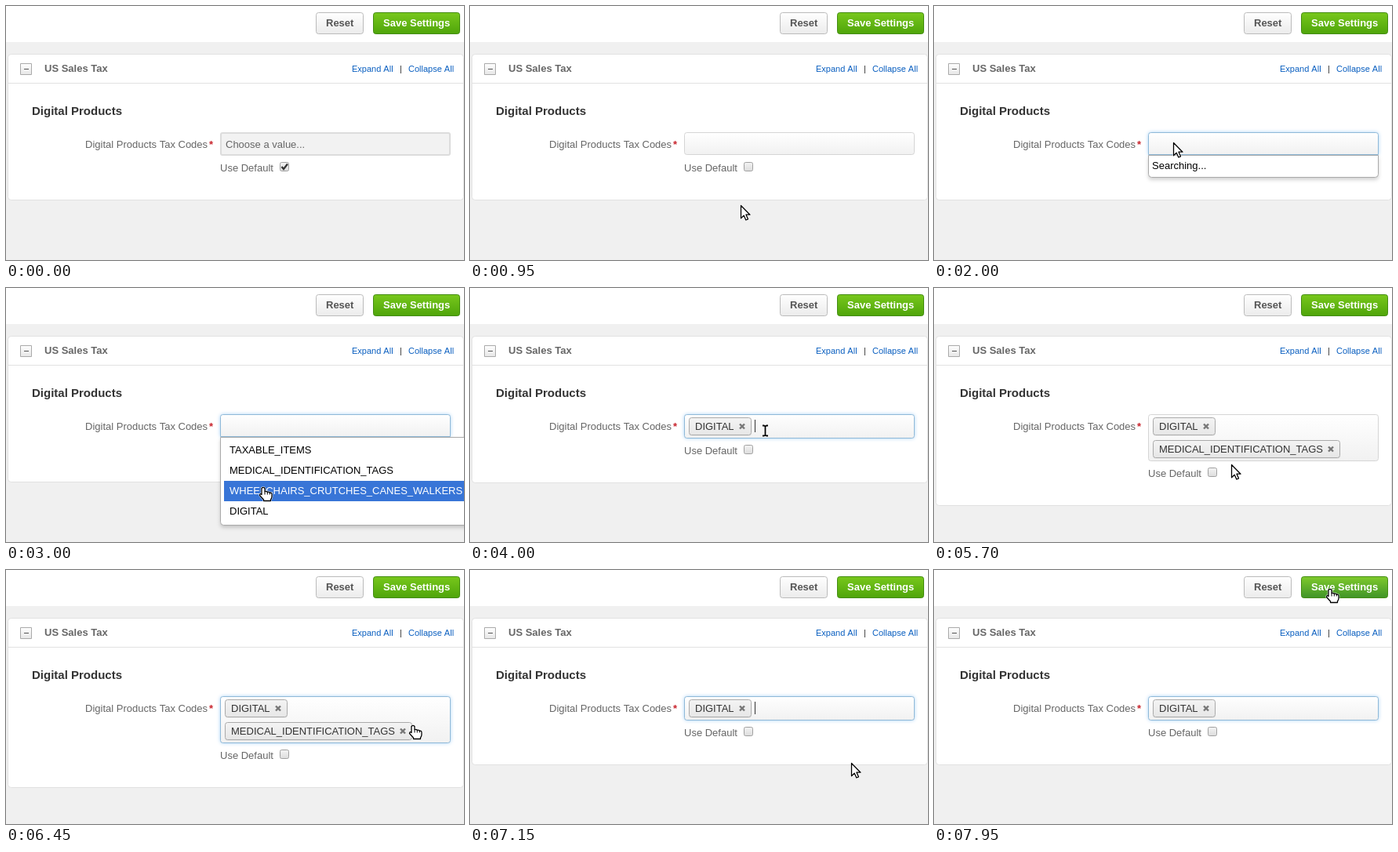
An HTML page with a canvas that plays this animation: 584x324 px, repeating every 8 s.

```html
<!DOCTYPE html>
<html>
<head>
<meta charset="utf-8">
<style>
html, body { margin: 0; width: 100%; height: 100%; overflow: hidden; background: #f0f0f0; }
canvas { display: block; }
</style>
</head>
<body>
<canvas id="stage" width="584" height="324"></canvas>
<script>
const ctx = document.getElementById('stage').getContext('2d');
const LOOP = 8000, STEP = 50;
const CODES = ['TAXABLE_ITEMS', 'MEDICAL_IDENTIFICATION_TAGS',
  'WHEELCHAIRS_CRUTCHES_CANES_WALKERS', 'DIGITAL'];

// Pointer path: time, x, y
const PATH = [
  [0, 366, 322], [50, 366, 304], [550, 337, 202], [700, 337, 202], [950, 345, 254],
  [1250, 312, 149], [1500, 305, 174], [2750, 305, 174], [3000, 328, 254], [3250, 325, 289],
  [3400, 325, 289], [3850, 376, 182], [5100, 376, 182], [5350, 378, 232], [5500, 378, 232],
  [5700, 379, 225], [5900, 428, 271], [6000, 428, 271], [6400, 521, 198], [6650, 506, 200],
  [6950, 506, 200], [7150, 486, 246], [7800, 503, 35], [7950, 505, 24]
];
const POINTERS = [[50, 'arrow'], [2850, 'hand'], [3500, 'arrow'], [3750, 'beam'], [4250, 'arrow'],
  [5200, 'hand'], [5500, 'arrow'], [6350, 'hand'], [7050, 'arrow'], [7850, 'hand']];
const SHAPES = {
  arrow: new Path2D('M.5 .5V16.8L4.2 13.3L6.8 19L9.5 17.8L7 12.2H12Z'),
  hand: new Path2D('M-2 1.5Q0-.9 2 1.5V6Q4 4.5 5.5 6.5Q7.5 5.5 8.5 7.5Q11 6.5 11 9.5V12Q11 14 9.5 16V17.5H.5V16L-4.5 10.5Q-4.5 7.5-2 9.5Z'),
  beam: new Path2D('M-3-6.5H-1L.5-5.5L2-6.5H4M.5-5.5V5.5M-3 6.5H-1L.5 5.5L2 6.5H4')
};

const within = (t, ...spans) => spans.some(([a, b]) => t >= a && t < b);

function pointerAt(t) {
  const i = PATH.findIndex(p => p[0] > t);
  if (i < 0) return PATH[PATH.length - 1].slice(1);
  const [t0, x0, y0] = PATH[i - 1], [t1, x1, y1] = PATH[i];
  let k = (t - t0) / (t1 - t0);
  k *= k * (3 - 2 * k);
  return [Math.round(x0 + (x1 - x0) * k), Math.round(y0 + (y1 - y0) * k)];
}

function text(str, x, y, color, font = '13px') {
  ctx.font = font + ' "Liberation Sans", Arial, sans-serif';
  ctx.fillStyle = color;
  ctx.fillText(str, x, y);
}

function fillRect(x, y, w, h, color) {
  ctx.fillStyle = color;
  ctx.fillRect(x, y, w, h);
}

// Rounded box with a vertical gradient, a border and an optional shadow
function box(x, y, w, h, r, top, bottom, border, shadow, line = 1) {
  const fill = ctx.createLinearGradient(0, y, 0, y + h);
  fill.addColorStop(0, top);
  fill.addColorStop(1, bottom);
  ctx.beginPath();
  ctx.roundRect(x + line / 2, y + line / 2, w - line, h - line, r);
  ctx.save();
  if (shadow) [ctx.shadowColor, ctx.shadowBlur, ctx.shadowOffsetY] = shadow;
  ctx.fillStyle = fill;
  ctx.fill();
  ctx.restore();
  ctx.strokeStyle = border;
  ctx.lineWidth = line;
  ctx.stroke();
}

function strokePath(points, color, width) {
  ctx.beginPath();
  points.forEach(([x, y], i) => i ? ctx.lineTo(x, y) : ctx.moveTo(x, y));
  ctx.strokeStyle = color;
  ctx.lineWidth = width;
  ctx.stroke();
}

function tag(label, y) {
  ctx.font = '13px "Liberation Sans", Arial, sans-serif';
  const w = Math.round(ctx.measureText(label).width);
  box(279, y, w + 30, 23, 3, '#f4f4f4', '#e6e6e6', '#aaa', ['rgba(0,0,0,.08)', 1, 1]);
  text(label, 287, y + 16, '#333');
  const x = 297 + w, c = y + 11.5;
  strokePath([[x - 3, c - 3], [x + 3, c + 3]], '#777', 2.4);
  strokePath([[x - 3, c + 3], [x + 3, c - 3]], '#777', 2.4);
}

function checkbox(y, checked) {
  box(349, y, 12, 12, 2, '#f4f4f4', '#dcdcdc', '#a0a0a0');
  if (checked) strokePath([[351.5, y + 6], [354, y + 9], [359, y + 2.5]], '#333', 2.3);
}

function header(hover) {
  fillRect(0, 0, 584, 324, '#f0f0f0');
  fillRect(0, 0, 584, 46, '#fff');
  box(395, 8, 61, 28, 3, '#fff', '#ebebeb', '#bbb');
  text('Reset', 408, 26, '#555', 'bold 13px');
  box(468, 8, 111, 28, 3, hover ? '#80cb2c' : '#78c81c', hover ? '#3f9328' : '#4ea40a', '#438c12');
  text('Save Settings', 481, 26, '#fff', 'bold 13px');
}

function panel(bottom) {
  box(2, 61, 582, bottom - 61, 4, '#fff', '#fff', '#e1e1e1');
  fillRect(3, 98, 580, 1, '#e1e1e1');
  box(18, 73, 15, 15, 0, '#fff', '#e6e6e6', '#aaa');
  fillRect(23, 80, 6, 1, '#555');
  text('US Sales Tax', 49, 84, '#666', 'bold 13px');
  text('Expand All', 441, 84, '#0a5fc0', '11px');
  text('|', 502, 84, '#333', '11px');
  text('Collapse All', 513, 84, '#0a5fc0', '11px');
  text('Digital Products', 33, 139, '#333', 'bold 15px');
  text('Digital Products Tax Codes', 101, 181, '#666');
  text('*', 259, 181, '#c8232c', 'bold 13px');
}

function dropdown(top, items, pointerY) {
  const h = items ? items.length * 26 + 9 : 29;
  box(273, top, items ? 340 : 294, h, [0, 0, 4, 4], '#fff', '#fff', '#aaa', ['rgba(0,0,0,.2)', 5, 3]);
  if (!items) return text('Searching...', 278, top + 18, '#000');
  const active = Math.max(0, Math.min(items.length - 1, Math.floor((pointerY - top - 4) / 26)));
  items.forEach((item, i) => {
    const y = top + 4 + i * 26;
    if (i === active) fillRect(278, y, 330, 26, '#3875d7');
    text(item, 285, y + 17, i === active ? '#fff' : '#000');
  });
}

function drawPointer(kind, x, y) {
  ctx.save();
  ctx.translate(x, y);
  ctx.lineJoin = 'round';
  const shape = SHAPES[kind];
  const stroke = (color, width) => {
    ctx.strokeStyle = color;
    ctx.lineWidth = width;
    ctx.stroke(shape);
  };
  if (kind === 'beam') {
    stroke('#fff', 4);
    stroke('#000', 1.8);
  } else {
    stroke('rgba(255,255,255,.7)', 2.6);
    ctx.fillStyle = '#fff';
    ctx.fill(shape);
    stroke('#000', 1.3);
    if (kind === 'hand')
      for (const dx of [2, 5.3, 8.3]) strokePath([[dx, 6.5], [dx, 9.5]], '#000', 1);
  }
  ctx.restore();
}

function render(t) {
  const [px, py] = pointerAt(t);
  const isDefault = t < 750;
  const digital = t >= 3500, medical = within(t, [5450, 7000]);
  const focus = within(t, [1500, 3500], [3800, 5450], [5800, LOOP]);
  const searching = within(t, [1500, 2450], [4250, 5150]);
  const listing = within(t, [2450, 3500], [5150, 5450]);
  const caret = within(t, [1500, 2000], [2500, 3000], [3800, 4750], [5250, 5450],
    [5800, 6300], [6800, 7500]);
  const fieldBottom = medical ? 221 : digital ? 192 : 190;
  const rowShift = medical ? 30 : digital ? 1 : 0;

  header(t >= 7850);
  panel(248 + rowShift);
  text('Use Default', 273, 211 + rowShift, '#666');
  checkbox(199 + rowShift, isDefault);

  if (isDefault) {
    box(273, 161, 294, 30, 2, '#f2f2f2', '#f2f2f2', '#dcdcdc', null, 2);
    text('Choose a value...', 280, 181, '#666');
  } else {
    box(273, 161, 294, fieldBottom - 161, searching || listing ? [3, 3, 0, 0] : 3, '#fff', '#f1f1f1',
      focus ? '#8fb9d8' : '#d5d5d5', focus && ['rgba(90,170,240,.6)', 5, 0]);
  }
  if (digital) tag('DIGITAL', 165);
  if (medical) tag('MEDICAL_IDENTIFICATION_TAGS', 194);
  if (caret) fillRect(medical ? 522 : digital ? 363 : 279, medical ? 197 : 168, 1, 16, '#333');
  if (searching || listing)
    dropdown(fieldBottom - (digital ? 1 : 0), listing && CODES.slice(0, digital ? 3 : 4), py);

  const pointer = POINTERS.filter(p => p[0] <= t).pop();
  if (pointer) drawPointer(pointer[1], px, py);
}

const start = performance.now();
function tick() {
  const t = (performance.now() - start) % LOOP;
  render(Math.floor(t / STEP) * STEP);
  requestAnimationFrame(tick);
}
tick();
</script>
</body>
</html>
```
